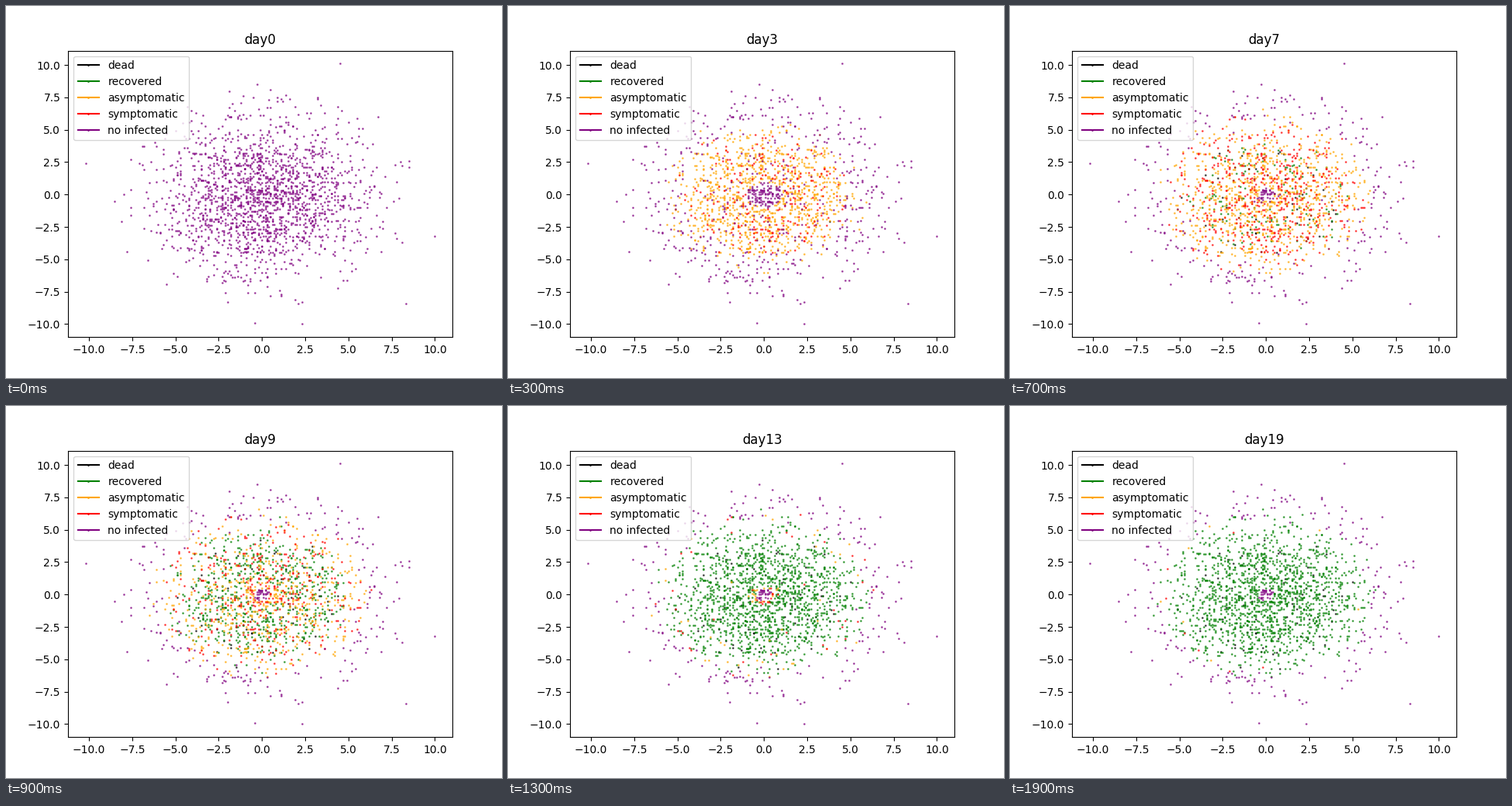
A matplotlib script for the animation above (2 s loop, 640 by 480 pixels).

```python
import numpy as np
import matplotlib.pyplot as plt
from matplotlib.animation import FuncAnimation

DAYS = 20
STATES = [("dead", "black"), ("recovered", "green"), ("asymptomatic", "orange"),
          ("symptomatic", "red"), ("no infected", "purple")]
DEAD, RECOVERED, ASYMPTOMATIC, SYMPTOMATIC, HEALTHY = range(5)

# Seeded crowd, with a few lone people at the edges of the plot
EDGE = [(4.5, 10.1), (-10.2, 2.4), (10, -3.2), (2.3, -10), (-0.4, -9.9), (8.3, -8.4)]
rng = np.random.default_rng(7)
crowd = rng.normal(0, 3, (1850, 2)).round(1)
people = np.vstack([crowd[np.hypot(*crowd.T) < 9], EDGE])
count = len(people)
radius = np.hypot(*people.T)


def beyond(limit):
    return np.clip(radius - limit, 0, None)


def some(share, days):
    return np.where(rng.random(count) < share, days, np.inf)


# The infection starts in a ring and creeps to the rim and to the centre
caught = (0.8 + 0.9 * beyond(4.2) + 8 * np.clip(1.2 - radius, 0, None)
          + rng.exponential(0.9 + 2 * beyond(4.5)))
immune = (radius < 0.5) | (radius > 6.3 + rng.normal(0, 0.3, count))
caught[immune] = np.inf
sick = some(0.38, caught + rng.uniform(0.2, 2.5, count))
healed = caught + rng.uniform(5, 9.5, count)
died = some(0.05, caught + rng.uniform(1.5, 8, count))
died[died > healed] = np.inf


def states(day):
    state = np.full(count, HEALTHY)
    for since, value in ((caught, ASYMPTOMATIC), (sick, SYMPTOMATIC),
                         (healed, RECOVERED), (died, DEAD)):
        state[since <= day] = value
    return state


plt.rcParams["text.kerning_factor"] = 6
fig, ax = plt.subplots(figsize=(6.4, 4.8), dpi=100)
ax.set_xlim(-11.21, 11.01)
ax.set_ylim(-11.005, 11.105)
title = ax.set_title("day0")
dots = [ax.plot([], [], "o", ms=1, color=color, alpha=0.6)[0] for _, color in STATES]
keys = [plt.Line2D([], [], marker="o", ms=1, color=color, label=name)
        for name, color in STATES]
ax.legend(handles=keys, loc="upper left")


def draw(day):
    state = states(day)
    for value, dot in enumerate(dots):
        dot.set_data(*people[state == value].T)
    title.set_text(f"day{day}")
    return [*dots, title]


anim = FuncAnimation(fig, draw, frames=DAYS, init_func=lambda: draw(0),
                     interval=100, repeat=True, repeat_delay=0)
plt.show()
```
